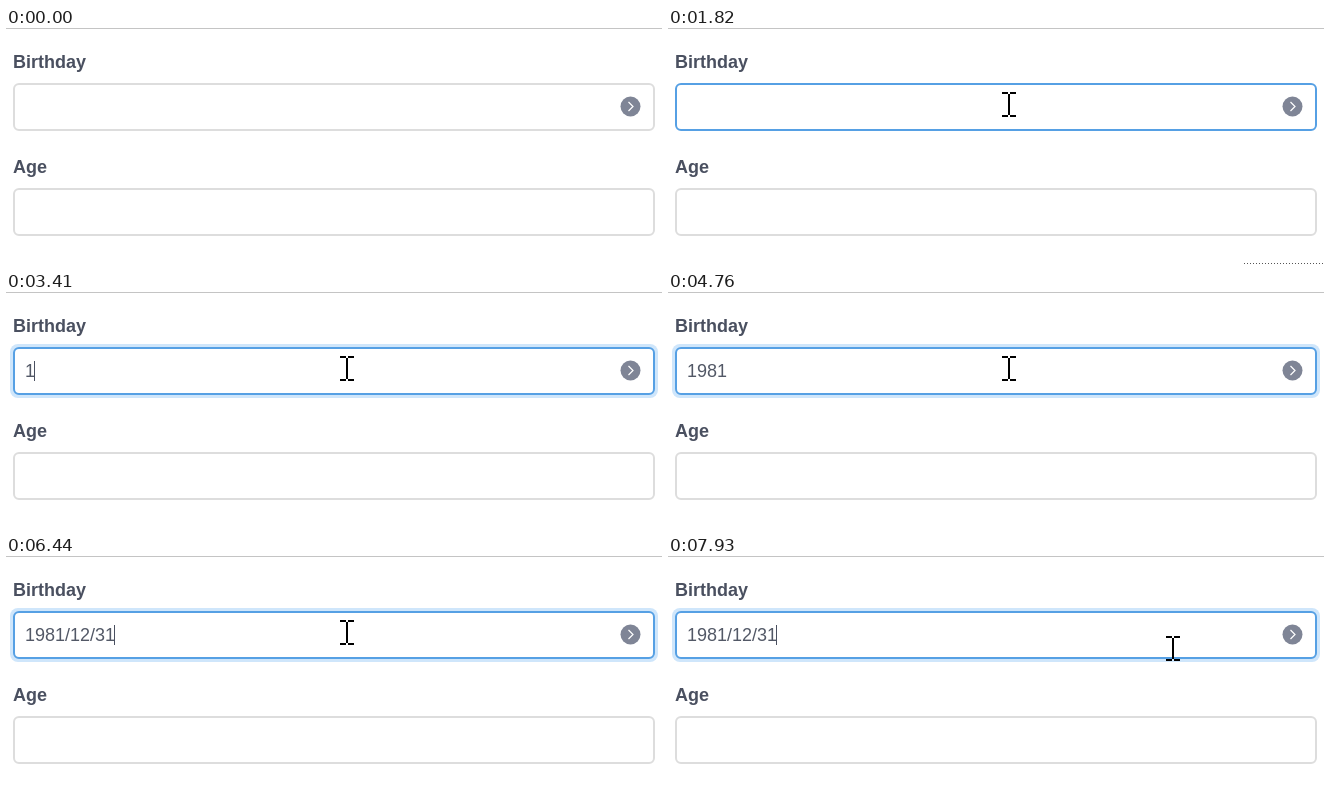
An HTML page that plays this animation: 656x236 px, repeating every 8000 ms.

```html
<!DOCTYPE html>
<html lang="en">
<head>
<meta charset="utf-8">
<title>Birthday form</title>
<style>
  html, body { margin: 0; width: 100%; height: 100%; overflow: hidden; background: #fff; }
  svg { display: block; }
  text { font: 18px "Liberation Sans", Arial, sans-serif; fill: #525866; }
  .label { font-weight: bold; fill: #4a5060; }
  .field { fill: #fff; stroke: #ddd; stroke-width: 2; }
</style>
</head>
<body>
<svg width="656" height="236" viewBox="0 0 656 236">
  <rect width="656" height="236" fill="#fff"/>
  <rect width="656" height="1" fill="#c4c4c4"/>
  <text class="label" x="7" y="40">Birthday</text>
  <text class="label" x="7" y="145">Age</text>
  <rect id="glow" x="4" y="52" width="648" height="54" rx="8" fill="#cfe6fb"/>
  <rect id="birthday" class="field" x="8" y="56" width="640" height="46" rx="5"/>
  <rect class="field" x="8" y="161" width="640" height="46" rx="5"/>
  <circle cx="624.5" cy="78.5" r="10" fill="#7f8596"/>
  <path d="M622.5 74l4.5 4.5-4.5 4.5" fill="none" stroke="#fff" stroke-width="1.2"/>
  <text id="value" x="19" y="85"></text>
  <rect id="caret" y="69" width="1" height="20" fill="#4a5060"/>
  <path id="dots" d="M576 235.5H655" stroke="#555" stroke-dasharray="1 2"/>
  <path id="pointer" d="M-7-12h6v2h-6zM1-12h6v2h-6zM-1-10h2v21h-2zM-7 11h6v2h-6zM1 11h6v2h-6z" fill="#000"/>
</svg>
<script>
const LOOP = 8000;
const DATE = "1981/12/31";
const KEYS = [3410, 3790, 4090, 4180, 4870, 5110, 5260, 5510, 6130, 6440];
const BLINKS = [[2860, 3410], [4760, 4870], [6060, 6130], [7000, 7530]];
const LEAVE = [7600, 7670, 7760, 7860, 7930];
const GRAY = [221, 221, 221], BLUE = [86, 160, 228];

const get = id => document.getElementById(id);
const [glow, birthday, value, caret, dots, pointer] =
  ["glow", "birthday", "value", "caret", "dots", "pointer"].map(get);

const within = (t, a, b) => t >= a && t < b;
const show = (el, on) => el.setAttribute("visibility", on ? "visible" : "hidden");
const passed = (times, t) => times.filter(k => t >= k).length;
const smooth = p => p * p * (3 - 2 * p);
const mix = (a, b, p) => `rgb(${a.map((v, i) => Math.round(v + (b[i] - v) * p))})`;

function hover(t) {
  if (t < 1680) return 0;
  if (t < 1750) return 0.15;
  return t < 1820 ? 0.65 : 1;
}

function placePointer(t) {
  const p = smooth(passed(LEAVE, t) / LEAVE.length);
  const x = 341 + Math.round(164 * p);
  const y = t < 1590 ? 223 : 76 + Math.round(16 * p);
  pointer.setAttribute("transform", `translate(${x} ${y})`);
  show(pointer, t >= 1500);
}

function typeDate(t) {
  const text = DATE.slice(0, passed(KEYS, t));
  const width = [...text].reduce((w, c) => w + (c === "/" ? 5 : 10), 0);
  value.textContent = text;
  caret.setAttribute("x", 19 + Math.max(0, width - 1));
  show(caret, t >= 2310 && !BLINKS.some(([a, b]) => within(t, a, b)));
}

function draw(t) {
  birthday.style.stroke = mix(GRAY, BLUE, hover(t));
  glow.setAttribute("opacity", t < 2370 ? 0 : t < 2460 ? 0.1 : 1);
  show(dots, within(t, 510, 2310));
  typeDate(t);
  placePointer(t);
}

let start;
function tick(now) {
  start ??= now;
  draw((now - start) % LOOP);
  requestAnimationFrame(tick);
}
draw(0);
requestAnimationFrame(tick);
</script>
</body>
</html>
```
